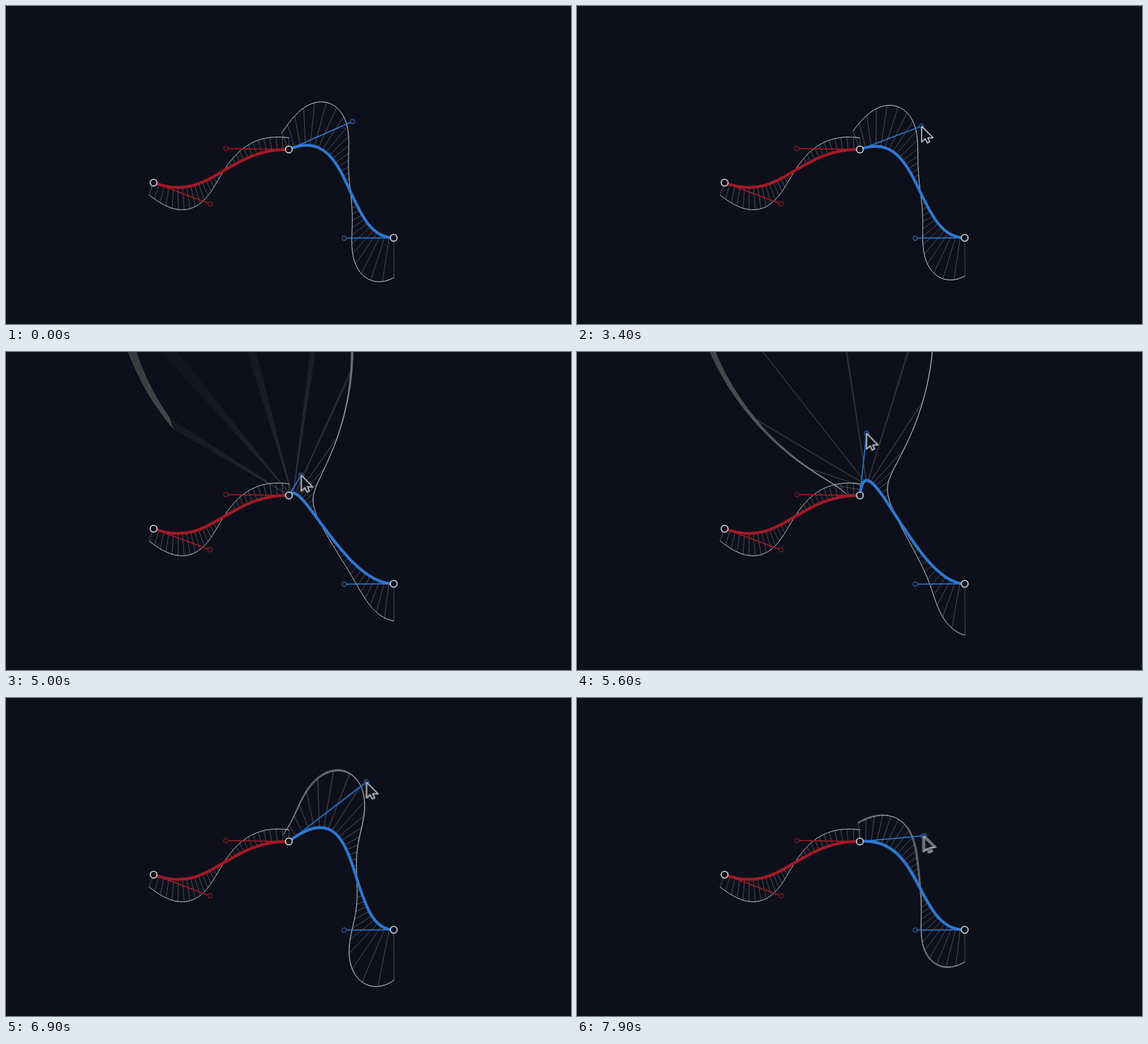
Write an HTML page with a canvas that moves like this. It is 800 px wide and 450 px high and loops after 8000 ms.

```html
<!DOCTYPE html>
<html>
<head>
<meta charset="utf-8">
<style>
html, body { margin: 0; width: 100%; height: 100%; overflow: hidden; background: #0d101a; }
canvas { display: block; width: 800px; height: 450px; }
</style>
</head>
<body>
<canvas id="stage" width="800" height="450"></canvas>
<script>
const W = 800, H = 450, LOOP = 8000;
const BG = '#0d101a', RED = '#a51926', BLUE = '#2f78d2', LIGHT = '#d2d3d6';
const COMB = 2500, TEETH = 31, DENSE = 10;
const SHUTTER = 22, BLUR = 10, GAMMA = 2.2;

const out = document.getElementById('stage').getContext('2d');
const layer = document.createElement('canvas');
layer.width = W;
layer.height = H;
const g = layer.getContext('2d', { willReadFrequently: true });

// Drag path of the blue handle: time, x, y
const drag = [
  [2500, 490.5, 163.5], [3400, 488, 170], [4300, 464.5, 187.5], [4900, 424, 180],
  [5300, 405, 147], [5600, 410, 115], [6250, 455, 102], [6900, 510.5, 119],
  [7150, 534, 153], [7400, 562, 168], [7900, 491, 195], [8100, 440, 198]
];
const redCurve = [[209, 250], [289, 280], [311.2, 201.7], [400.5, 203]];
const arrow = [[0, 0], [0, 22.5], [5.2, 17.8], [8, 23.8], [11.4, 22.2], [8.8, 16.6], [16.3, 16.6]];

const clamp = x => Math.min(1, Math.max(0, x));
const smooth = x => x * x * (3 - 2 * x);

function slope(i, a) {
  if (i === 0 || i === drag.length - 1) return 0;
  const p = drag[i - 1], n = drag[i + 1];
  return (n[a] - p[a]) / (n[0] - p[0]);
}

function handleAt(time) {
  if (time <= drag[0][0]) return [drag[0][1], drag[0][2]];
  let i = 0;
  while (i < drag.length - 2 && time > drag[i + 1][0]) i++;
  const p = drag[i], q = drag[i + 1], d = q[0] - p[0];
  const u = clamp((time - p[0]) / d), v = 1 - u;
  return [1, 2].map(a =>
    p[a] * smooth(v) + q[a] * smooth(u) +
    d * u * v * (slope(i, a) * v - slope(i + 1, a) * u));
}

// Point on the curve and the tip of its curvature tooth
function sample([a, b, c, d], t) {
  const s = 1 - t;
  const on = k => s * s * s * a[k] + 3 * s * s * t * b[k] + 3 * s * t * t * c[k] + t * t * t * d[k];
  const vel = k => s * s * (b[k] - a[k]) + 2 * s * t * (c[k] - b[k]) + t * t * (d[k] - c[k]);
  const acc = k => s * (c[k] - 2 * b[k] + a[k]) + t * (d[k] - 2 * c[k] + b[k]);
  const x = on(0), y = on(1), vx = vel(0), vy = vel(1);
  const len = Math.hypot(vx, vy) || 1e-6;
  const k = COMB * 2 / 3 * (vx * acc(1) - vy * acc(0)) / len ** 4;
  return { x, y, tx: x + vy * k, ty: y - vx * k };
}

function stroke(color, width) {
  g.strokeStyle = color;
  g.lineWidth = width;
  g.stroke();
}

function drawComb(curve) {
  const n = TEETH * DENSE;
  const pts = Array.from({ length: n + 1 }, (_, i) => sample(curve, i / n));
  g.beginPath();
  for (let i = 0; i <= n; i += DENSE) {
    g.moveTo(pts[i].x, pts[i].y);
    g.lineTo(pts[i].tx, pts[i].ty);
  }
  stroke('rgba(215,218,225,0.42)', 0.7);
  g.beginPath();
  for (const p of pts) g.lineTo(p.tx, p.ty);
  stroke(LIGHT, 1);
}

function ring([x, y], r, color, width) {
  g.beginPath();
  g.arc(x, y, r, 0, 7);
  g.fillStyle = BG;
  g.fill();
  stroke(color, width);
}

function drawCurve([a, b, c, d], color) {
  g.beginPath();
  g.moveTo(...a);
  g.bezierCurveTo(...b, ...c, ...d);
  stroke(color, 4);
  for (const [p, q] of [[a, b], [d, c]]) {
    g.beginPath();
    g.moveTo(...p);
    g.lineTo(...q);
    stroke(color, 1.5);
    ring(q, 3.2, color, 1);
  }
}

function drawCursor(time, handle) {
  const alpha = clamp((time - 1400) / 300);
  if (!alpha) return;
  const u = smooth(clamp((time - 1437) / 1000));
  g.save();
  g.globalAlpha = alpha;
  g.translate(400 + (handle[0] - 400) * u, 225 + (handle[1] - 225) * u);
  g.beginPath();
  for (const p of arrow) g.lineTo(...p);
  g.closePath();
  g.fillStyle = BG;
  g.fill();
  stroke('#bcbcc0', 1.6);
  g.restore();
}

function drawScene(time) {
  const handle = handleAt(time);
  const blueCurve = [[400.5, 203], handle, [479, 328.5], [549, 328]];
  g.fillStyle = BG;
  g.fillRect(0, 0, W, H);
  g.lineJoin = 'round';
  drawComb(redCurve);
  drawComb(blueCurve);
  drawCurve(redCurve, RED);
  drawCurve(blueCurve, BLUE);
  for (const p of [redCurve[0], redCurve[3], blueCurve[3]]) ring(p, 4.8, LIGHT, 1.6);
  drawCursor(time, handle);
}

// Motion blur: averages several instants in linear light
const linear = Float32Array.from({ length: 256 }, (_, v) => (v / 255) ** GAMMA);
const light = new Float32Array(W * H * 3);
const lit = new Uint8Array(W * H);

function expose() {
  const { data } = g.getImageData(0, 0, W, H);
  const pixels = new Uint32Array(data.buffer);
  const empty = pixels[pixels.length - 1], base = data.length - 4;
  for (let i = 0; i < pixels.length; i++) {
    if (pixels[i] === empty) continue;
    lit[i] = 1;
    for (let c = 0; c < 3; c++) {
      light[i * 3 + c] += (linear[data[i * 4 + c]] - linear[data[base + c]]) / BLUR;
    }
  }
}

function develop() {
  g.fillStyle = BG;
  g.fillRect(0, 0, W, H);
  const image = g.getImageData(0, 0, W, H), { data } = image;
  for (let i = 0; i < lit.length; i++) {
    if (!lit[i]) continue;
    for (let c = 0; c < 3; c++) {
      const sum = linear[data[i * 4 + c]] + light[i * 3 + c];
      data[i * 4 + c] = 255 * Math.max(0, sum) ** (1 / GAMMA);
    }
  }
  out.putImageData(image, 0, 0);
}

function render(time) {
  if (time < 1350) {
    drawScene(time);
    out.drawImage(layer, 0, 0);
    return;
  }
  light.fill(0);
  lit.fill(0);
  for (let i = 0; i < BLUR; i++) {
    drawScene(time + SHUTTER * ((i + 0.5) / BLUR - 0.5));
    expose();
  }
  develop();
}

let start;
function tick(now) {
  if (start === undefined) start = now;
  render((now - start) % LOOP);
  requestAnimationFrame(tick);
}
render(0);
requestAnimationFrame(tick);
</script>
</body>
</html>
```
